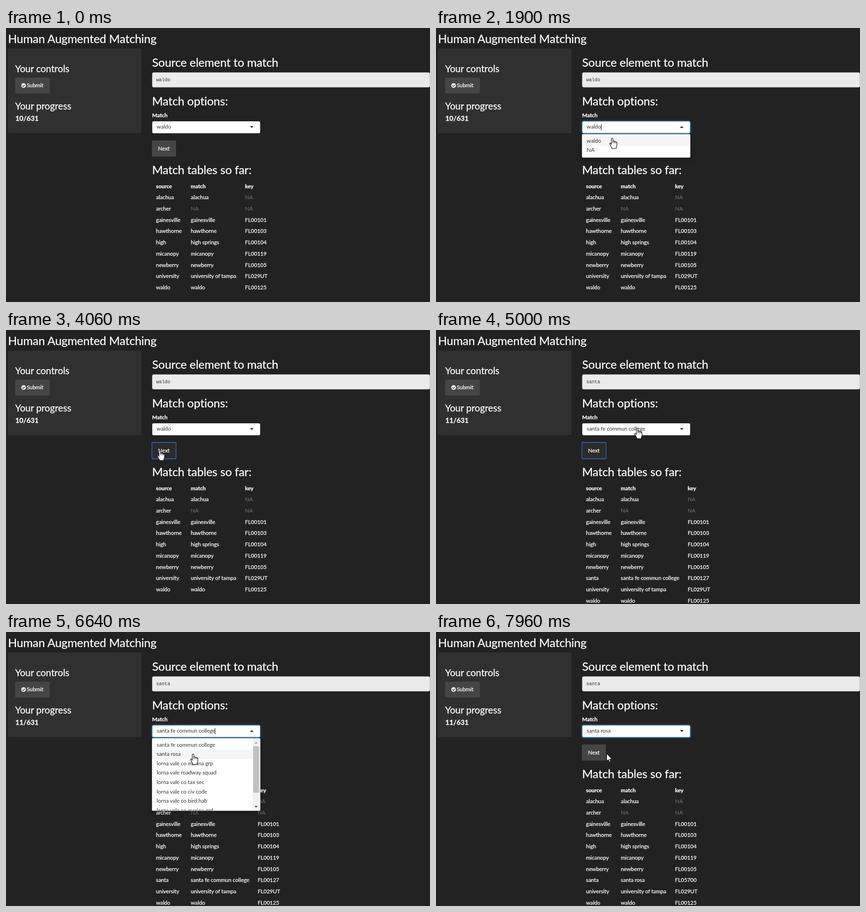
Recreate the animation shown at these times as an HTML page. Size 930 by 602 pixels, loop 8000 ms.

```html
<!DOCTYPE html>
<html lang="en">
<head>
<meta charset="utf-8">
<title>Human Augmented Matching</title>
<style>
html, body { margin: 0; width: 100%; height: 100%; overflow: hidden; background: #222; }
svg { display: block; width: 930px; height: 602px; }
text { font: 12px Lato, sans-serif; letter-spacing: -.07px; fill: #fff; stroke: #fff; stroke-width: .28; white-space: pre; }
.b { font-weight: 700; }
.h2 { font-size: 25.6px; letter-spacing: -.15px; }
.h3 { font-size: 20.8px; letter-spacing: -.07px; }
.h4 { font-size: 15.2px; font-weight: 700; letter-spacing: 0; }
.na { fill: #7a727a; stroke: none; }
.ink { fill: #333; stroke: none; }
.code { font: 10.2px "Liberation Mono", monospace; letter-spacing: 0; fill: #303030; stroke: none; }
.focus { stroke: #4a94dc; stroke-width: 1.2; filter: drop-shadow(0 0 2px rgba(82,168,236,.55)); }
.menu { filter: drop-shadow(0 5px 5px rgba(0,0,0,.18)); }
</style>
</head>
<body>
<svg id="stage" viewBox="0 0 930 602" xmlns="http://www.w3.org/2000/svg">
  <defs><clipPath id="clip"><rect x="321" y="234" width="236" height="158"/></clipPath></defs>
  <rect width="930" height="602" fill="#222"/>
  <rect x="4" y="45" width="293" height="186" rx="3" fill="#303030"/>
  <rect x="20" y="109" width="76" height="35" rx="3" fill="#464545"/>
  <circle cx="38.6" cy="126.4" r="5.1" fill="#fff"/>
  <path d="M35.8 126.4l2.1 2.2 3.7-3.9" fill="none" stroke="#464545" stroke-width="1.6"/>
  <rect x="320.9" y="97.9" width="608.7" height="32.2" rx="3" fill="#ebebeb" stroke="#ccc" stroke-width=".8"/>
  <g id="labels"></g>
  <g id="table"></g>
  <rect id="next"/>
  <text x="333.6" y="269">Next</text>
  <rect id="box" x="320.8" y="205" width="236.6" height="26.2" rx="3" fill="#fff"/>
  <path id="arrow" fill="#222"/>
  <text id="choice" class="ink" x="330.6" y="221"></text>
  <g id="menu" class="menu"></g>
  <rect id="caret" y="211" width="1" height="14" fill="#111"/>
  <g id="cursor"></g>
</svg>
<script>
const LOOP = 8000;
const $ = id => document.getElementById(id);
const text = (x, y, s, cls = '') => `<text x="${x}" y="${y}" class="${cls}">${s}</text>`;
const rect = (x, y, w, h, fill, more = '') =>
  `<rect x="${x}" y="${y}" width="${w}" height="${h}" fill="${fill}" ${more}/>`;
const set = (el, attrs) => { for (const k in attrs) el.setAttribute(k, attrs[k]); };
const fill = (el, html) => { if (el.last !== html) el.innerHTML = el.last = html; };

const COLLEGE = 'santa fe commun college', ROSA = 'santa rosa';
const SHORT = ['waldo', 'NA'];
const LONG = [COLLEGE, ROSA, 'lorna vale co marina grp', 'lorna vale roadway squad',
  'lorna vale co tax sec', 'lorna vale co civ code', 'lorna vale co bird hab', 'lorna vale co marina grd'];

const ROWS = [
  ['alachua', 'alachua', 'NA'], ['archer', 'NA', 'NA'],
  ['gainesville', 'gainesville', 'FL00101'], ['hawthorne', 'hawthorne', 'FL00103'],
  ['high', 'high springs', 'FL00104'], ['micanopy', 'micanopy', 'FL00119'],
  ['newberry', 'newberry', 'FL00105'], ['university', 'university of tampa', 'FL029UT'],
  ['waldo', 'waldo', 'FL00125']
];

const SHAPES = {
  arrow: '<path d="M.5 .5V16.6L4.2 13.2 6.7 18.7 9 17.7 6.6 12.2H11.6Z" fill="#fff" stroke="#000" stroke-width=".9"/>',
  hand: `<g transform="translate(-.7 .5)"><path d="M-1.7 14.5V2Q-1.7 .5 0 .5T1.7 2V7.6Q2 6.4 3.4 6.6T4.9 8.2Q5.4 7.2 6.7 7.5T8 9.2
    Q8.6 8.5 9.6 8.9T10.5 10.6V15.5Q10.5 18 9 20V23.3H-.8V21Q-3 18.5-4.2 15.5L-5.4 13.2Q-5.8 11.8-4.6 11.4T-2.6 12.6Z"
    fill="#fff" stroke="#000" stroke-width="1.1" stroke-linejoin="round"/>
    <path d="M1.7 7.5V11.5M4.9 8.5V11.8M8 9.5V12" stroke="#000" fill="none"/></g>`,
  beam: '<path d="M-3.5-7.5H-1L0-6.7 1-7.5H3.5M0-6.7V6.7M-3.5 7.5H-1L0 6.7 1 7.5H3.5" fill="none" stroke="#111"/>'
};

// pointer stops: time, shape, hot spot
const A = 'arrow', H = 'hand', I = 'beam';
const STOPS = [
  [250, A, 611, 408], [320, A, 555, 267], [550, A, 541, 250], [640, H, 523, 229],
  [720, H, 516, 216], [1110, H, 515, 216], [1430, I, 515, 218],
  [1730, I, 500, 221], [1830, H, 432, 239], [1900, H, 387, 241], [1970, H, 362, 250],
  [2040, H, 346, 261], [2110, H, 339, 266], [2350, H, 345, 255], [2430, H, 353, 242],
  [2510, A, 357, 235], [2660, A, 357, 233], [2810, H, 357, 239], [2890, H, 357, 241],
  [2970, H, 357, 243], [3200, A, 357, 244], [3500, H, 350, 252], [3590, H, 342, 259],
  [3670, H, 338, 263], [4470, A, 365, 240], [4540, H, 400, 222], [4610, A, 437, 202],
  [4770, H, 437, 206], [4850, H, 439, 210], [4920, H, 441, 213], [5000, H, 442, 215],
  [5620, I, 442, 218], [6170, I, 441, 221], [6250, H, 437, 240], [6330, H, 430, 248],
  [6410, H, 424, 255], [6490, H, 418, 261], [6560, H, 414, 265], [6640, H, 411, 267],
  [7420, A, 411, 267], [7800, A, 398, 267], [7880, A, 382, 267], [7960, A, 374, 267]
];

function labels(moved) {
  return text(4.4, 33, 'Human Augmented Matching', 'h2') +
    text(20, 97, 'Your controls', 'h3') + text(45.5, 130, 'Submit') +
    text(20, 179, 'Your progress', 'h3') + text(20.5, 204, (moved ? 11 : 10) + '/631', 'h4') +
    text(320.4, 85, 'Source element to match', 'h2') +
    text(329.5, 117, moved ? 'santa' : 'waldo', 'code') +
    text(320.4, 170, 'Match options:', 'h2') + text(320.4, 196, 'Match', 'b') +
    text(320.4, 321, 'Match tables so far:', 'h2');
}

function table(extra) {
  const rows = ROWS.slice();
  if (extra) rows.splice(7, 0, ['santa', ...extra]);
  const cols = [329, 405.3, extra && extra[0] === COLLEGE ? 552 : 524.3];
  return [['source', 'match', 'key'], ...rows].map((r, i) => r.map((s, j) =>
    text(cols[j], Math.round(351.6 + 24.72 * i), s, i ? s === 'NA' ? 'na' : '' : 'b')).join('')).join('');
}

function menu(list, active) {
  const long = list.length > 2, h = long ? 159 : 51, w = long ? 220 : 236;
  let s = rect(320.5, 233.5, 237, h, '#fff', 'rx="2" stroke="#d0d0d0"') + '<g clip-path="url(#clip)">';
  s += rect(321, 238 + 20.6 * active, w, 20.6, '#f5f5f5');
  list.forEach((o, i) => { s += text(330.6, Math.round(251.6 + 20.6 * i), o, 'ink'); });
  if (long) s += rect(541, 234, 16, 158, '#f1f1f1') + rect(542, 251, 13, 102, '#c1c1c1') +
    '<path d="M545 245h7l-3.5-4z" fill="#a3a3a3"/><path d="M545 382h7l-3.5 4z" fill="#505050"/>';
  return s + '</g>';
}

function draw(t) {
  const within = (a, b) => t >= a && t < b;
  const first = within(1430, 3200), second = within(5620, 7420), open = first || second;
  const moved = t >= 4140;
  const stop = STOPS.filter(p => p[0] <= t).pop();

  fill($('labels'), labels(moved));
  fill($('table'), table(t >= 7490 ? [ROSA, 'FL05700'] : t >= 4210 ? [COLLEGE, 'FL00127'] : null));

  const ring = within(3970, 5620), hover = within(3500, 4470);
  set($('next'), ring
    ? { x: 320, y: 247, width: 53, height: 36, rx: 2, fill: '#2c2b2b', stroke: '#3e6fc6', 'stroke-width': 1.3 }
    : { x: 320, y: 247, width: 53, height: 35.5, rx: 3, fill: hover ? '#2c2b2b' : '#464545', stroke: 'none' });

  const focus = within(1430, 3970) || t >= 5620;
  set($('box'), { class: focus ? 'focus' : '', stroke: focus ? '#4a94dc' : 'none' });
  $('arrow').setAttribute('d', open ? 'M535 219.5h8l-4-4z' : 'M535 215.5h8l-4 4z');
  fill($('choice'), t >= 7420 ? ROSA : moved ? COLLEGE : 'waldo');

  const active = stop && stop[1] === H && stop[3] > 258 ? 1 : 0;
  fill($('menu'), open ? menu(first ? SHORT : LONG, active) : '');

  const blink = within(1430, 1930) || within(2430, 2930) || within(5620, 6170) || within(6640, 7190);
  set($('caret'), { x: first ? 362 : 458, visibility: blink ? 'visible' : 'hidden' });

  fill($('cursor'), stop ? SHAPES[stop[1]] : '');
  if (stop) $('cursor').setAttribute('transform', `translate(${stop[2]} ${stop[3]})`);
}

const start = performance.now();
function tick() {
  draw((performance.now() - start) % LOOP);
  requestAnimationFrame(tick);
}
draw(0);
requestAnimationFrame(tick);
</script>
</body>
</html>
```
